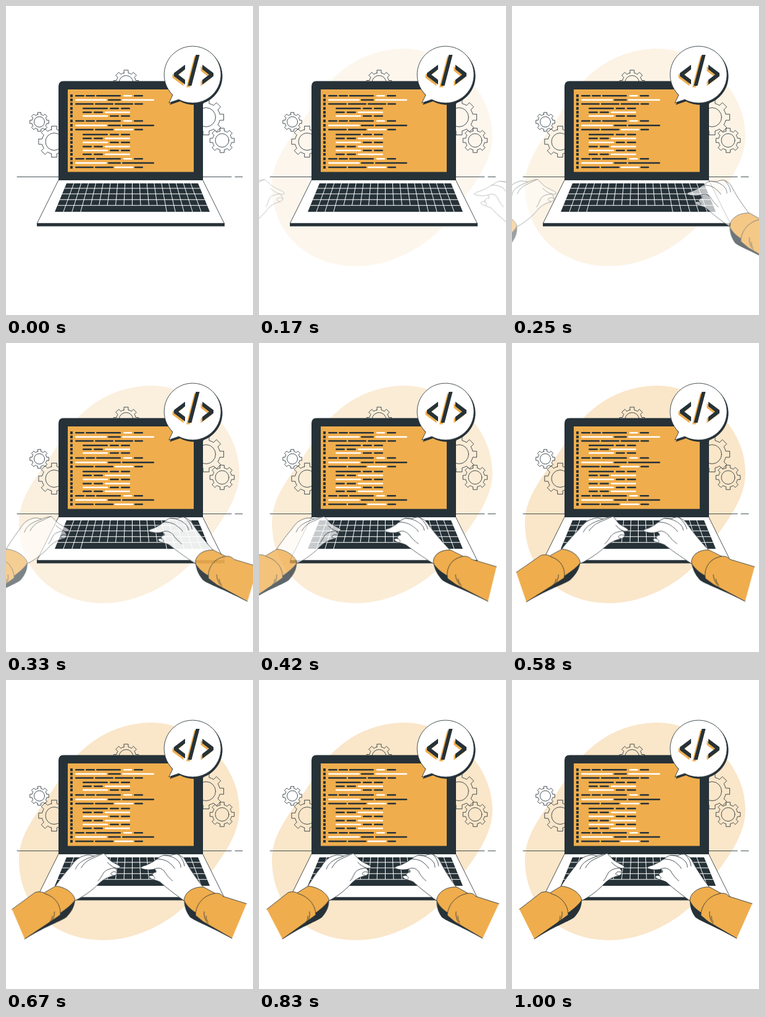
Write an HTML page that moves like this. It is 400 px wide and 500 px high and loops after 1.04 s.

```html
<!DOCTYPE html>
<html lang="en">
<head>
<meta charset="utf-8">
<title>Typing on a laptop</title>
<style>
  html, body { margin: 0; width: 100%; height: 100%; overflow: hidden; background: #fff; }
  svg { display: block; width: 100vw; height: 100vh; }
  :root { --t: 0; --dark: #263238; --orange: #efad4d; }

  .dark { fill: var(--dark); }
  .orange { fill: var(--orange); }
  .white { fill: #fff; }
  .line { stroke: var(--dark); stroke-width: .85; stroke-linejoin: round; stroke-linecap: round; }
  .none { fill: none; }

  /* Paused animations, placed in time by --t */
  .blob, .left, .right {
    animation: 1s linear calc(var(--t) * -1ms) both paused;
    transform-origin: 0 340px;
  }
  .blob { animation-name: fade; }
  .left { animation-name: fromLeft; }
  .right { animation-name: fromRight; animation-timing-function: cubic-bezier(.36, -.01, .5, 1.38); }

  @keyframes fade { 0% { opacity: 0; } 60%, 100% { opacity: 1; } }
  @keyframes fromLeft {
    0% { transform: translateX(-200px) skewX(20deg); opacity: 0; }
    60% { transform: translateX(0) skewX(-10deg); opacity: 1; }
    80% { transform: translateX(0) skewX(2deg); opacity: 1; }
    100% { transform: translateX(0) skewX(0); opacity: 1; }
  }
  @keyframes fromRight {
    0% { transform: translateX(200px) skewX(-20deg); opacity: 0; }
    60% { transform: translateX(0) skewX(10deg); opacity: 1; }
    80% { transform: translateX(0) skewX(-2deg); opacity: 1; }
    100% { transform: translateX(0) skewX(0); opacity: 1; }
  }
</style>
</head>
<body>
<svg viewBox="0 0 400 500">
  <defs>
    <path id="bubble" d="M280 151.4A46 46 0 1 0 270 144L264 156.500Z"/>
    <path id="code" d="M290 95v7.500L279 111 290 119.500v7.500L272 113.500v-5ZM318 95v7.500L329 111 318 119.500v7.500L336 113.500v-5ZM307.500 79h6L300.500 129h-6Z"/>
    <path id="crease" class="none line" d="M320 375C319 383 322 390 326 394M323 382C323 387 324 389 326 391"/>
  </defs>

  <path class="blob" fill="#fae6c9" d="M237 69C300 69 378 130 378 210C378 250 352 285 318 330C295 375 225 421 158 421C75 421 21 365 21 291C21 240 62 205 88 158C115 112 165 69 237 69Z"/>
  <path class="none line" d="M18 276.500H365M371 276.500H383"/>
  <g id="gears" class="none line"></g>

  <path class="white line" d="M85.500 281.500H318.500L353.500 352H50.500Z"/>
  <path class="dark" d="M50 351.500H354V356.500H50Z"/>
  <path class="dark" d="M85 282V130Q85 121.500 93 121.500H311Q319 121.500 319 130V282Z"/>
  <path class="orange" d="M100 135H304V268.500H100Z"/>
  <g id="lines"></g>
  <path class="dark" d="M98 287H311L330 333H79Z"/>
  <path id="keys" class="none" stroke="#fff"/>

  <use href="#bubble" class="dark line" x="2" y="2.500"/>
  <use href="#bubble" class="white line"/>
  <use href="#code" class="orange" x="-2.500" y="2.500"/>
  <use href="#code" class="dark"/>

  <g class="left">
    <path class="dark" d="M113 356C113 368 108 376 101 384C92 391 75 395 36 419.500L60 385Z"/>
    <path class="white line" d="M79 334C88 320 96 309 102 302C105 297 108 293 112 289.500C117 286 122 284 128 283C132 283 135 284 138 285C143 283 149 281 154 280.500C158 284 161 288 164 291C170 296 178 298 182 302C183 305 178 305 174 304C176 306 178 309 178 312C177 316 172 317 168 318C161 320 155 324 150 329C140 340 127 350 113 357Z"/>
    <path class="none line" d="M174 304C168 305 160 306 156 312C153 317 152 321 148 325M174 304C169 302 165 299 161 295M178 312C174 309 170 310 168 313C168 315 170 316 172 316M110 306C112 300 115 297 119 294C124 290 130 288 138 285M119 304C122 298 127 293 133 290C140 287 146 284 154 280.500"/>
    <path class="orange line" d="M61 345C67 341 74 337 80 333.500C97 335 111 346 113 356C108 364 100 370 91 377Z"/>
    <path class="orange line" d="M36 419L80 388 91 380C91 365 81 351 64 346C59 342 52 342 47 344L12 371"/>
    <use href="#crease" transform="translate(401) scale(-1 1)"/>
  </g>
  <g class="right">
    <path class="dark" d="M288 356C288 368 291 376 297 384C306 391 325 397 364 418.500L340 385Z"/>
    <path class="white line" d="M292 360C278 350 262 338 250 327C245 324 236 323 233 320C231 317 235 315 239 317C236 314 240 311 244 311C244 308 243 307 241 306C234 308 226 307 220 305C218 303 222 301 227 300C234 297 240 294 245 290C250 287 253 284 257 283.500C262 284 266 284 269 284C272 282 276 281.500 280 282C284 284 289 287 291 291C296 301 306 318 320 336Z"/>
    <path class="none line" d="M239 317C241 319 243 320 240 322M241 306C247 303 252 304 257 309C261 316 265 321 270 325M245 290C253 289 263 292 268 298C272 301 273 303 274 305M257 283.500C268 284 276 288 281 294C283 297 284 299 284 303M280 282C284 286 289 292 290 301"/>
    <path class="orange line" d="M288 357C288 345 302 334 320 335L340 346 307 377C299 372 292 366 288 357Z"/>
    <path class="orange line" d="M364 418L318 391 306 381C306 366 317 350 335 346C341 344 348 345 351 350L389 362"/>
    <use href="#crease"/>
  </g>
</svg>
<script>
  const get = id => document.getElementById(id);

  // Gears: centre x, centre y, outer radius, hole radius
  function gear([x, y, r, hole]) {
    const root = r * .78;
    const at = (a, d) => `${(x + d * Math.sin(a)).toFixed(2)} ${(y - d * Math.cos(a)).toFixed(2)}`;
    let d = '';
    for (let i = 0; i < 8; i++) {
      const a = i * Math.PI / 4;
      d += i ? `A${root} ${root} 0 0 1 ` : 'M';
      d += `${at(a - .22, root)}L${at(a - .17, r)} ${at(a + .17, r)} ${at(a + .22, root)}`;
    }
    d += `A${root} ${root} 0 0 1 ${at(-.22, root)}Z`;
    return `<path d="${d}"/><circle cx="${x}" cy="${y}" r="${hole}"/>`;
  }
  get('gears').innerHTML = [
    [54, 187.5, 15.5, 8.5], [78, 219.5, 25.5, 14], [194.5, 124, 20.5, 11.5],
    [324, 180, 29, 15.5], [350, 217.5, 20, 11]
  ].map(gear).join('');

  // Code on the screen: a row kind is its segments; "w" marks a white one
  const kinds = {
    A: '112-127 129-144 146-186 190-204w 207-222',
    B: '112-163w 165-186 188-240w',
    C: '112-142 144-174 176-206 208-222',
    D: '124-165 168-183 186-201',
    E: '124-139 142-157 160-201w',
    F: '124-165w 168-183 186-201',
    G: '112-163w 165-186 188-240',
    H: '112-142 144-174 176-206w 208-222'
  };
  const rowY = [145.3, 152, 158.5, 165.7, 172, 178, 186, 193.2, 200,
    208, 214.3, 220.7, 227.5, 233.8, 240, 247.3, 254, 261];
  get('lines').innerHTML = [...'ABCDEFAGHDEFEFEAGH'].map((kind, i) => {
    const y = rowY[i];
    const bars = kinds[kind].split(' ').map(s => {
      const [a, b] = s.split('-').map(parseFloat);
      return `<rect class="${s.endsWith('w') ? 'white' : 'dark'}" x="${a}" y="${y - 1.2}" width="${b - a}" height="2.4" rx="1.2"/>`;
    });
    return `<rect class="dark" x="104" y="${y - 2.2}" width="4" height="4.4"/>` + bars.join('');
  }).join('');

  // Gaps between the keys; the space bar leaves out columns 4 to 12
  const keyX = (col, y) => {
    const depth = (y - 287) / 46;
    return 98 - 19 * depth + col / 18 * (213 + 38 * depth);
  };
  let gaps = '';
  for (const y of [295, 304, 313.3, 322.7]) gaps += `M${keyX(0, y)} ${y}H${keyX(18, y)}`;
  for (let i = 1; i < 18; i++) {
    const end = i > 3 && i < 13 ? 322.7 : 333;
    gaps += `M${keyX(i, 287)} 287L${keyX(i, end)} ${end}`;
  }
  get('keys').setAttribute('d', gaps);

  // 24 pictures a second; the first two are still empty
  const LOOP = 1040, FPS = 24, LEAD = 30;
  function draw() {
    const step = Math.floor((performance.now() % LOOP + 4) * FPS / 1000);
    const t = step < 2 ? 0 : Math.min(step * 1000 / FPS + LEAD, 1000);
    document.documentElement.style.setProperty('--t', t);
    requestAnimationFrame(draw);
  }
  draw();
</script>
</body>
</html>
```
